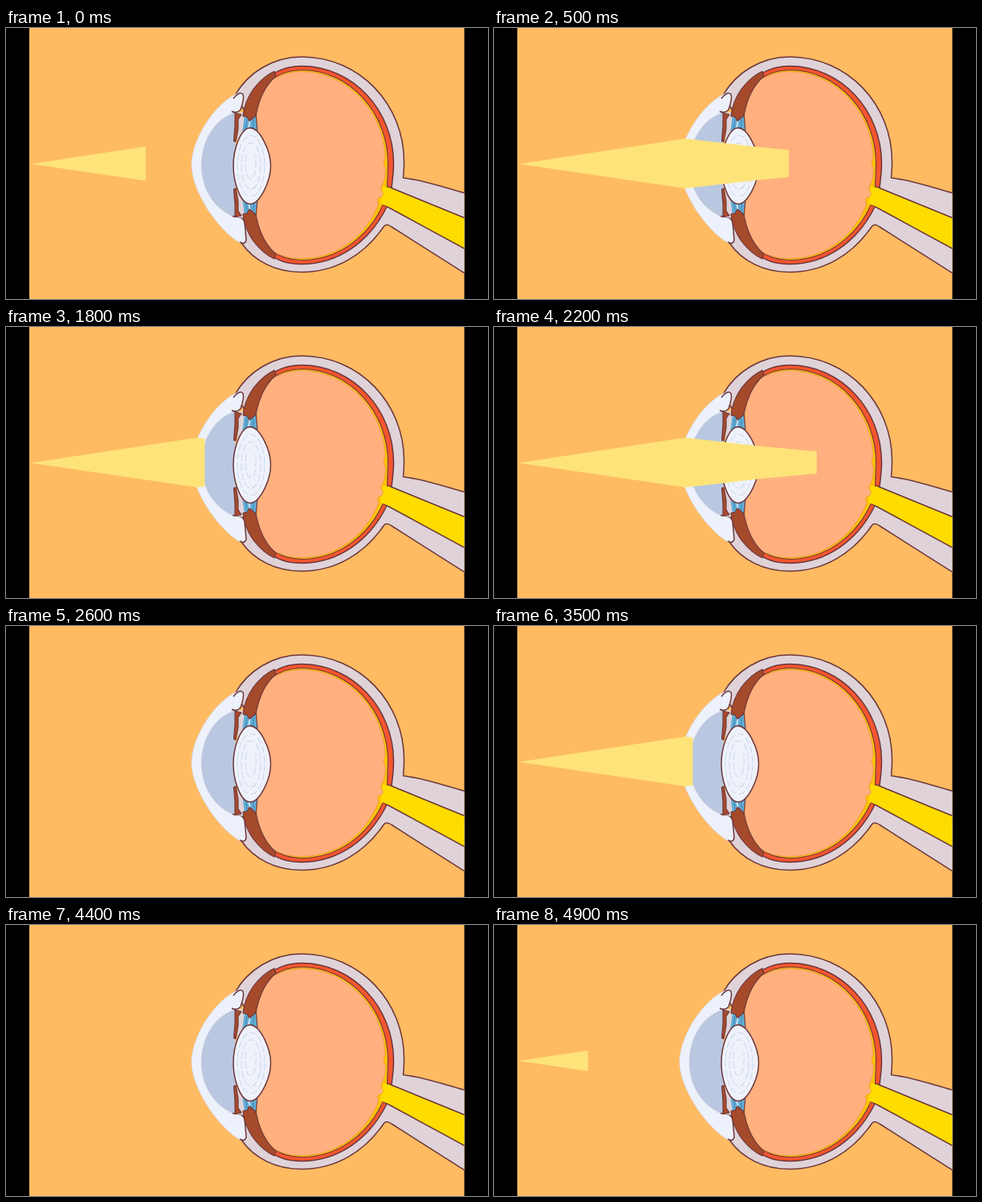
Animation, 600 px wide and 338 px high, one loop 5000 ms. Source, as an HTML page:

```html
<!DOCTYPE html>
<html lang="en">
<head>
<meta charset="utf-8">
<title>Light entering the eye</title>
<style>
  html, body { margin: 0; width: 100%; height: 100%; overflow: hidden; background: #000; }
  svg { display: block; width: 100vw; height: 100vh; }
  .line { stroke: #6b363a; stroke-width: 1.5; stroke-linejoin: round; }
  .thin { stroke: #6b363a; stroke-width: 1.1; stroke-linejoin: round; }
  .sclera { fill: #dfd3d9; }
  .choroid { fill: #f4552f; }
  .retina { fill: #ffc20a; }
  .vitreous { fill: #ffb07e; }
  .nerve { fill: #ffdc00; }
  .cornea { fill: #edf1fb; }
  .chamber { fill: #b9c7e0; }
  .muscle { fill: #a64a2c; }
  .fiber { fill: #62add6; }
  .lens { fill: #eff2fb; }
  .rings { fill: none; stroke: #cbdaea; stroke-width: 1.1; stroke-dasharray: 9 3; }
</style>
</head>
<body>
<svg viewBox="0 0 600 338" preserveAspectRatio="none">
  <defs>
    <clipPath id="stage"><rect x="29" width="541.5" height="338"/></clipPath>
    <clipPath id="wipe"><rect id="edge" x="29" width="0" height="338"/></clipPath>
    <g id="half">
      <path class="sclera" d="M289 106 L300 104 L300 126 L288 140 Z"/>
      <path class="fiber" d="M297 108 L311 108 L313 128 L303 126 L294 131 Z"/>
      <path d="M304 113 L302 125" fill="none" stroke="#e6f2f8" stroke-width="1.5"/>
      <path d="M300 114 L298 127 M308 114 L308 125" fill="none" stroke="#3f84ad" stroke-width="1"/>
      <path class="muscle thin" d="M295 110 C296 99 301 86 308 76 C315 67 323 59 334 54
        L336 60 C323 71 315 88 311 109 L308 112 L303 116 L300 111 Z"/>
      <path d="M311 107 L313 128" class="thin" fill="none"/>
      <path class="muscle thin" d="M285 106 L293 108 L289 114 L289 126 L286 142 L283.500 141 L285 122 Z"/>
    </g>
  </defs>

  <g clip-path="url(#stage)">
    <rect x="29" width="542" height="338" fill="#ffbb62"/>

    <path class="sclera line" d="M285 84 C301 56 332 36 368 36 C441 36 495.500 96 495.500 167
      C495.500 175 495 181 494.500 187 C517 189 545 199 575 207 L575 308.500
      L480 248 Q473 243 470 248
      C446 283 410 304.500 368 304.500 C336 304.500 309 291 293 268 L299 236 L299 106 Z"/>

    <path class="choroid line" d="M326 62 C338 52 351 47.500 368 47.500 C432 47.500 482.500 103 482.500 169
      C482.500 180 481 190 480 199 L474 223 C453 266 414 294.500 368 294.500
      C350 294.500 336 290 326 280 Z"/>
    <path class="retina thin" d="M332 64 C342 56 354 52.500 368 52.500 C428 52.500 475.500 106 475.500 169
      L474.500 199 L469 221 C450 262 412 289.500 368 289.500 C354 289.500 342 286 332 278 Z"/>
    <path class="nerve line" d="M476 198 L575 238.500 L575 277.500 L471 221 L468 209 Z"/>
    <path class="nerve" d="M469 198 L477 199 L482 203 L482 225 L466 219 Z"/>
    <path class="vitreous" stroke="#e89a36" stroke-width=".8" d="M332 64 C344 57 356 54.500 368 54.500
      C426 54.500 471 106 472 162 Q468 168 472 174 C473 183 471 191 468 197
      Q465 200 469 205 Q470 210 466 211 Q460 212 464 219
      C449 258 414 287.500 368 287.500 C354 287.500 342 285 332 278
      C318 262 312 246 312 222 L312 120 C312 96 318 79 332 64 Z"/>

    <path class="chamber" d="M284 100 C256 110 240 142 240 171 C240 202 260 232 286 242
      L291 225 L286 198 L284 172 L286 142 L292 108 Z"/>
    <path class="cornea" stroke="#d9dae2" stroke-width=".8" d="M287 82 C258 96 231 140 231 171
      C231 201 262 252 293 269 L297 266 L296 248 L285 236
      C258 226 243 199 243 171 C243 143 258 115 283 106 L291 103 L295 88 Z"/>
    <path class="cornea line" d="M283 88 Q291 78 295 83 Q297 87 292 102 Q287 107 281 104"/>
    <path class="cornea line" d="M282 235 Q295 234 297 242 L299 264 Q298 271 291 267"/>

    <use href="#half"/>
    <use href="#half" transform="matrix(1 0 0 -1 0 342)"/>

    <path class="lens line" d="M304 124.500 C316 125 329.500 153 329.500 172 C329.500 191 316 219.500 304 219.500
      C292 219.500 283 193 283 172 C283 151 292 125 304 124.500 Z"/>
    <g class="rings">
      <ellipse cx="305" cy="172" rx="17" ry="38"/>
      <ellipse cx="305" cy="172" rx="12" ry="29"/>
      <path d="M299 158 Q296 187 305 188 Q312 187 311 158"/>
    </g>

    <path clip-path="url(#wipe)" fill="#fee379" d="M31 169.500 L238 138 L325 148 L472 162
      L472 176 L325 190 L238 200 Z"/>
  </g>
</svg>
<script>
  const LOOP = 5000, STEP = 100;
  const FIRST = 93, SPEED = 38.6, FOCUS = 472, SHOWN = 12;
  const starts = [-2.1, 14, 31, 48.38]; // in steps of 100 ms
  const edge = document.getElementById("edge");

  function beamEnd(step) {
    const start = starts.find(s => step >= Math.floor(s) && step < Math.floor(s) + SHOWN);
    if (start === undefined) return 29;
    return Math.min(FOCUS, FIRST + SPEED * Math.max(0, step - start));
  }

  const origin = performance.now();
  function draw(now) {
    const step = Math.floor((Math.max(0, now - origin) % LOOP) / STEP);
    edge.setAttribute("width", beamEnd(step) - 29);
    requestAnimationFrame(draw);
  }
  draw(origin);
</script>
</body>
</html>
```
